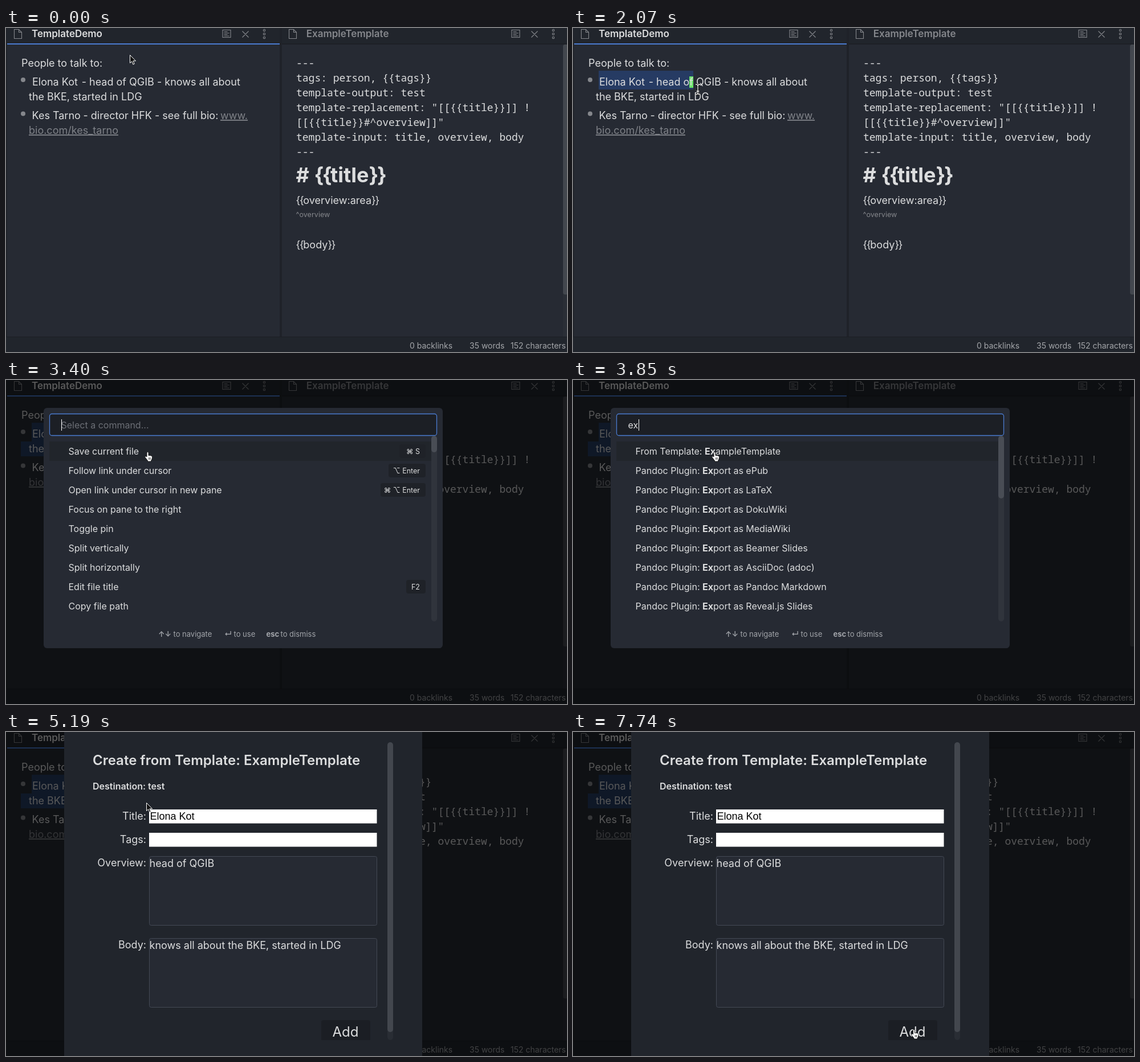
Animation, 984 px wide and 569 px high, one loop 8 s. Source, as an HTML page:

```html
<!DOCTYPE html>
<html lang="en">
<head>
<meta charset="utf-8">
<title>Template demo</title>
<style>
html, body { margin: 0; width: 100%; height: 100%; overflow: hidden; background: #262a33; }
svg { display: block; width: 984px; height: 569px; font: 18px Inter, "DejaVu Sans", sans-serif; font-optical-sizing: none; }
text { fill: #dcddde; white-space: pre; }
.mono { font-family: "Noto Sans Mono", "DejaVu Sans Mono", monospace; }
.bold { font-weight: 600; }
.brace { letter-spacing: -.07em; }
.link { fill: #7f8288; text-decoration: underline; }
.dim { fill: #85878c; }
.s16 { font-size: 16px; }
.status { font-size: 14px; fill: #a4a6aa; }
.hint { font-size: 13px; fill: #a2a5aa; }
.key { font-size: 12.5px; text-anchor: end; }
.end { text-anchor: end; }
.icon { fill: none; stroke: #85878c; stroke-width: 1.1; }
</style>
</head>
<body>
<svg viewBox="0 0 984 569">
  <defs>
    <path id="file" d="M14.5 2.5h8l5 5v11h-13zM22.5 2.5v5h5"/>
    <g id="tools">
      <path d="M380 3.500h14v13h-14zM382.500 6.500h6M382.500 9h9M382.500 11.500h6M382.500 14h9M414.500 5.500l11 11M425.500 5.500l-11 11"/>
      <circle cx="453" cy="4" r="1.700"/><circle cx="453" cy="10.500" r="1.700"/><circle cx="453" cy="17" r="1.700"/>
    </g>
    <path id="beam" d="M-4-9q4 0 4 3q0-3 4-3M0-6V6M-4 9q4 0 4-3q0 3 4 3M-2.500 3h5"/>
  </defs>

  <!-- workspace -->
  <rect width="984" height="569" fill="#262a33"/>
  <rect width="984" height="28" fill="#21252c"/>
  <rect width="2" height="543" fill="#1f2229"/>
  <rect x="480" width="4" height="543" fill="#1f2229"/>
  <rect x="484" y="27" width="500" height="2" fill="#1d2026"/>
  <rect x="2" y="27" width="478" height="2" fill="#4a7bd0"/>
  <rect y="542" width="984" height="27" fill="#21252c"/>
  <rect y="542" width="984" height="1" fill="#1b1e24"/>
  <rect x="977" y="29" width="7" height="513" fill="#2a2e36"/>
  <rect x="977" y="29" width="9" height="439" rx="3.500" fill="#43474e"/>
  <g class="icon">
    <use href="#file"/><use href="#file" x="482"/>
    <use href="#tools"/><use href="#tools" x="507"/>
  </g>
  <text class="bold" font-size="17" x="45" y="16">TemplateDemo</text>
  <text class="bold dim" font-size="17" x="526.700" y="16">ExampleTemplate</text>

  <path id="sel" fill="#263b63"/>
  <rect id="block" fill="#6be36b" height="20"/>
  <text x="27" y="68">People to talk to:</text>
  <circle cx="30" cy="91" r="4" fill="#85878c"/>
  <text x="46" y="101">Elona Kot</text>
  <text x="132.700" y="101">- head of QGIB - knows all about</text>
  <text x="40" y="127">the BKE, started in LDG</text>
  <circle cx="30" cy="150.500" r="4" fill="#85878c"/>
  <text x="45.500" y="160">Kes Tarno</text>
  <text x="135.500" y="160">- director HFK - see full bio:</text>
  <text class="link" x="376" y="160">www.</text>
  <text class="link" x="40" y="186">bio.com/kes_tarno</text>

  <g id="yaml" class="mono"></g>
  <text font-size="36" font-weight="700" x="508.500" y="271"># <tspan class="brace">{{</tspan>title<tspan class="brace">}}</tspan></text>
  <text x="508.500" y="309"><tspan class="brace">{{</tspan>overview:area<tspan class="brace">}}</tspan></text>
  <text class="dim" font-size="12.600" x="508.500" y="332">^overview</text>
  <text x="508.500" y="387"><tspan class="brace">{{</tspan>body<tspan class="brace">}}</tspan></text>
  <text class="status" x="708" y="563">0 backlinks</text>
  <text class="status" x="813" y="563">35 words</text>
  <text class="status" x="885" y="563">152 characters</text>

  <rect id="shade" width="984" height="569" opacity=".6"/>

  <!-- command palette -->
  <g id="palette">
    <rect x="66" y="49" width="700" height="422" rx="6" fill="#262a33"/>
    <rect x="76.500" y="59.500" width="679" height="38" rx="4" fill="#1c1f25" stroke="#4a7bd0" stroke-width="1.300"/>
    <text id="query" class="s16" x="96.500" y="85"></text>
    <rect id="caret" y="69" width="1" height="20" fill="#fff"/>
    <rect x="76" y="108" width="670" height="34" fill="#21252b"/>
    <rect x="746" y="98" width="10" height="326" rx="5" fill="#30343c"/>
    <rect id="thumb" x="746" y="98" width="10" rx="5" fill="#494d55"/>
    <g id="rows" class="s16"></g>
    <text class="hint bold" x="267" y="451">↑↓</text>
    <text class="hint" x="293.500" y="451">to navigate</text>
    <text class="hint bold" x="383" y="451">↵</text>
    <text class="hint" x="399.500" y="451">to use</text>
    <text class="hint" font-weight="700" x="456.500" y="451">esc</text>
    <text class="hint" x="481.500" y="451">to dismiss</text>
  </g>

  <!-- template form -->
  <g id="form">
    <rect x="102" width="628" height="569" fill="#21252c"/>
    <text class="bold" font-size="24" x="152" y="58">Create from Template: ExampleTemplate</text>
    <text class="bold s16" x="152" y="101">Destination: test</text>
    <text class="end" x="246" y="154">Title:</text>
    <text class="end" x="246" y="195">Tags:</text>
    <text class="end" x="246" y="236">Overview:</text>
    <text class="end" x="246" y="380">Body:</text>
    <path d="M251 136h399.500v24.500H251zM251 177h399.500v24.500H251z" fill="#fff"/>
    <text x="252.500" y="154" style="fill:#000;font-family:'Liberation Sans',Arial,sans-serif">Elona Kot</text>
    <g fill="#262a33" stroke="#444955">
      <rect x="251.500" y="218.500" width="399" height="121" rx="3"/>
      <rect x="251.500" y="362.500" width="399" height="121" rx="3"/>
    </g>
    <text x="251.500" y="237">head of QGIB</text>
    <text x="251.500" y="381">knows all about the BKE, started in LDG</text>
    <path d="M553 541V510q0-4 4-4h78q4 0 4 4v31z" fill="#1b1e24"/>
    <text font-size="24" x="572.500" y="535">Add</text>
    <rect x="669" y="18" width="10" height="523" rx="5" fill="#292d34"/>
    <rect x="669" y="18" width="10" height="509" rx="5" fill="#43474e"/>
  </g>

  <g id="mouse">
    <path id="arrow" d="M.500.500V14.500L3.700 11.600 5.900 17 8.200 16 6 10.800H10.500z" fill="#111" stroke="#fff"/>
    <g id="ibeam" fill="none">
      <use href="#beam" stroke="#000" stroke-width="3"/>
      <use href="#beam" stroke="#fff" stroke-width="1.300"/>
    </g>
    <path id="hand" d="M3.500 9V2q0-1.700 1.500-1.700T6.500 2V6.500q3-.3 5 .6q1.500.4 1.500 2.400q0 4-2 6V17H5V15.500Q3 13 1 10.500Q-.5 8.600 1 8Q2.500 7.600 3.500 9zM7.300 10v4M9.500 10v4" fill="#fff" stroke="#111" stroke-width=".9"/>
  </g>
</svg>
<script>
const $ = id => document.getElementById(id);
const show = (id, on) => $(id).style.display = on ? '' : 'none';
const at = (keys, t) => keys.filter(k => k[0] <= t).pop();

$('yaml').innerHTML = ['---', 'tags: person, {{tags}}', 'template-output: test',
  'template-replacement: "[[{{title}}]] !', '[[{{title}}#^overview]]"',
  'template-input: title, overview, body', '---']
  .map((s, i) => `<text x="509" y="${68 + 26 * i}">${s}</text>`).join('');

const commands = ['Save current file', 'Follow link under cursor', 'Open link under cursor in new pane',
  'Focus on pane to the right', 'Toggle pin', 'Split vertically', 'Split horizontally',
  'Edit file title', 'Copy file path'];
const keycaps = [[0, 690, '⌘ S'], [1, 671, '⌥ Enter'], [2, 657, '⌘ ⌥ Enter'], [7, 702, 'F2']];
const exports = ['From Template: *Exa*mpleTemplate', ...['ePub', 'LaTeX', 'DokuWiki', 'MediaWiki',
  'Beamer Slides', 'AsciiDoc (adoc)', 'Pandoc Markdown', 'Reveal.js Slides']
  .map(s => 'Pandoc Plugin: *Ex*port *a*s ' + s)];

// Fill the palette for the first n typed letters; *stars* mark matched letters.
function search(n) {
  const list = [
    commands,
    commands.map(s => s.replace(/e/i, '*$&*')),
    exports.map(s => s.replace('*a*', 'a').replace('Exa*', 'Ex*a')),
    exports
  ][n];
  const rows = list.map((s, i) => `<text x="109.500" y="${131 + 34 * i}">` +
    s.replace(/\*(.+?)\*/g, '<tspan font-weight="700">$1</tspan>') + '</text>');
  const keys = n > 1 ? [] : keycaps.map(([i, x, s]) =>
    `<rect x="${x}" y="${113 + 34 * i}" width="${736 - x}" height="24" rx="4" fill="#1f2228"/>` +
    `<text class="key" x="726" y="${129.5 + 34 * i}">${s}</text>`);
  $('rows').innerHTML = rows.concat(keys).join('');
  $('query').textContent = n ? 'exa'.slice(0, n) : 'Select a command...';
  $('query').style.fill = n ? '' : '#6c6f76';
  $('caret').setAttribute('x', [97, 106, 115, 124][n]);
  $('thumb').setAttribute('height', [29, 36, 110, 181][n]);
}

// time, shape, x, y
const moves = [
  [0, 'arrow', 217, 47], [150, 'ibeam', 268, 48], [290, 'ibeam', 246, 92], [430, 'ibeam', 192, 146],
  [580, 'ibeam', 145, 183], [880, 'ibeam', 112, 152], [1030, 'ibeam', 66, 106], [1180, 'ibeam', 36, 70],
  [1330, 'ibeam', 46, 93], [1470, 'ibeam', 92, 96], [1620, 'ibeam', 138, 100], [1770, 'ibeam', 182, 103],
  [1920, 'ibeam', 213, 106], [2070, 'ibeam', 219, 108], [2220, 'ibeam', 228, 115], [2370, 'ibeam', 240, 121],
  [2520, 'ibeam', 248, 125], [3260, 'hand', 243.5, 126], [5040, 'arrow', 246, 124], [6390, ''],
  [6690, 'arrow', 213, 88], [6840, 'ibeam', 376, 240], [6990, 'ibeam', 541, 394], [7290, 'ibeam', 562, 438],
  [7440, 'arrow', 586, 489], [7590, 'hand', 605, 519], [7740, 'hand', 593, 522]
];
// time, line, selection end, block width
const marks = [
  [0, 0, 45, 0], [1330, 0, 55, 10], [1470, 0, 87, 10], [1620, 0, 128, 5], [1770, 0, 168, 11],
  [1920, 0, 204, 11], [2070, 0, 211, 7], [2220, 1, 216, 12], [2370, 1, 227, 12], [2520, 1, 240, 14]
];

let typed = -1;
function draw(now) {
  const t = now % 8000;
  const [, line, end, width] = at(marks, t);
  $('sel').setAttribute('d', line ? `M45 75H446V108H${end}V134H26V108H45z` : `M45 75H${end}V108H45z`);
  $('block').setAttribute('x', end - width);
  $('block').setAttribute('y', line ? 111 : 85);
  $('block').setAttribute('width', t < 2960 ? width : 0);

  show('shade', t >= 3400);
  show('palette', t >= 3400 && t < 5190);
  show('form', t >= 5190);
  show('caret', t < 4440 || t >= 5040);
  const n = [3700, 3850, 4000].filter(k => k <= t).length;
  if (n !== typed) search(typed = n);

  const [, shape, x = 0, y = 0] = at(moves, t);
  ['arrow', 'ibeam', 'hand'].forEach(s => show(s, s === shape));
  $('mouse').setAttribute('transform', `translate(${x} ${y})`);
  requestAnimationFrame(draw);
}
draw(0);
</script>
</body>
</html>
```
